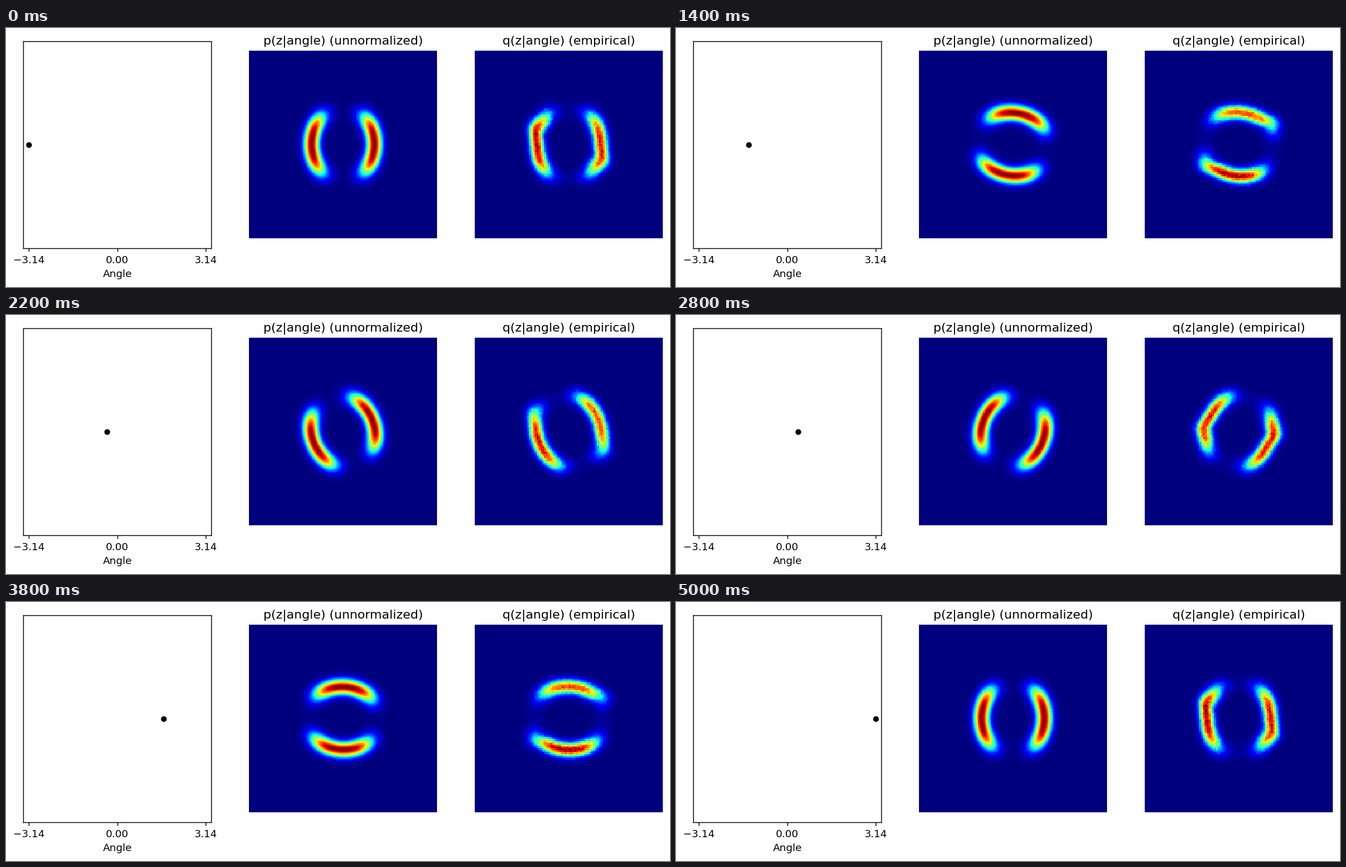
A matplotlib script for the animation above (5.2 s loop, 1197x468 px).

```python
import numpy as np
import matplotlib.pyplot as plt
from matplotlib.animation import FuncAnimation

WIDTH, HEIGHT, DPI = 1197, 468, 133
FRAMES, INTERVAL = 26, 200
LIMIT = 6.0
ANGLES = np.linspace(-np.pi, np.pi, FRAMES)


def polar_grid(n):
    centers = (np.arange(n) + 0.5) / n * 2 * LIMIT - LIMIT
    x, y = np.meshgrid(centers, centers[::-1])
    return np.hypot(x, y), np.arctan2(y, x)


FINE_R, FINE_PHI = polar_grid(300)
BIN_R, BIN_PHI = polar_grid(100)


def lobes(radius, turn, ring_width=0.4):
    """Ring cut into two arcs centred on turn = 0 and turn = pi."""
    u = radius * np.cos(turn)
    ring = np.exp(-0.5 * ((radius - 2) / ring_width) ** 2)
    return ring * sum(np.exp(-0.5 * ((u - c) / 0.6) ** 2) for c in (-2, 2))


def exact_density(angle):
    density = lobes(FINE_R, FINE_PHI + angle)
    return density / density.max()


def sampled_density(step):
    angle = ANGLES[step]
    turn = BIN_PHI + angle

    # The approximation bends outwards at a corner that swings with the angle.
    corner = np.radians(12 * np.sin(4 * angle) - 24 * np.cos(2 * angle))
    bump = np.exp(8 * (np.cos(2 * (BIN_PHI - corner)) - 1))
    stretch = 1.01 + 0.06 * np.sin(turn) ** 2 + 0.09 * bump

    balance = 1 + 0.08 * np.cos(angle - 0.6 * np.pi) * np.sign(np.cos(turn))
    radius = BIN_R / stretch
    haze = 0.015 * np.exp(-0.5 * ((radius - 2) / 0.3) ** 2)
    density = balance * lobes(radius, turn, 0.34) + haze
    counts = np.random.default_rng(step).poisson(900 * density)
    return counts / counts.max()


fig = plt.figure(figsize=(WIDTH / DPI, HEIGHT / DPI + 1e-6), dpi=DPI,
                 facecolor="white")


def add_axes(left, top, width, height):
    return fig.add_axes([left / WIDTH, 1 - (top + height) / HEIGHT,
                         width / WIDTH, height / HEIGHT])


def add_image(left, title, data):
    ax = add_axes(left, 41, 339, 339)
    ax.set_title(title)
    ax.axis("off")
    return ax.imshow(data, cmap="jet", vmin=0, vmax=1, aspect="auto",
                     interpolation="nearest")


dial = add_axes(31.2, 23.9, 339, 374)
dial.set_xlim(-np.pi - 0.2, np.pi + 0.2)
dial.set_ylim(-1, 1)
dial.set_xticks([-np.pi, 0, np.pi], ["\u22123.14", "0.00", "3.14"])
dial.set_yticks([])
dial.set_xlabel("Angle")
dot, = dial.plot([ANGLES[0]], [0], "o", color="black", markersize=5.6,
                 markeredgewidth=0)

exact = add_image(438, "p(z|angle) (unnormalized)", exact_density(ANGLES[0]))
sampled = add_image(845, "q(z|angle) (empirical)", sampled_density(0))


def update(step):
    dot.set_data([ANGLES[step]], [0])
    exact.set_data(exact_density(ANGLES[step]))
    sampled.set_data(sampled_density(step))
    return dot, exact, sampled


animation = FuncAnimation(fig, update, frames=FRAMES, interval=INTERVAL,
                          repeat=True, repeat_delay=0)
plt.show()
```
